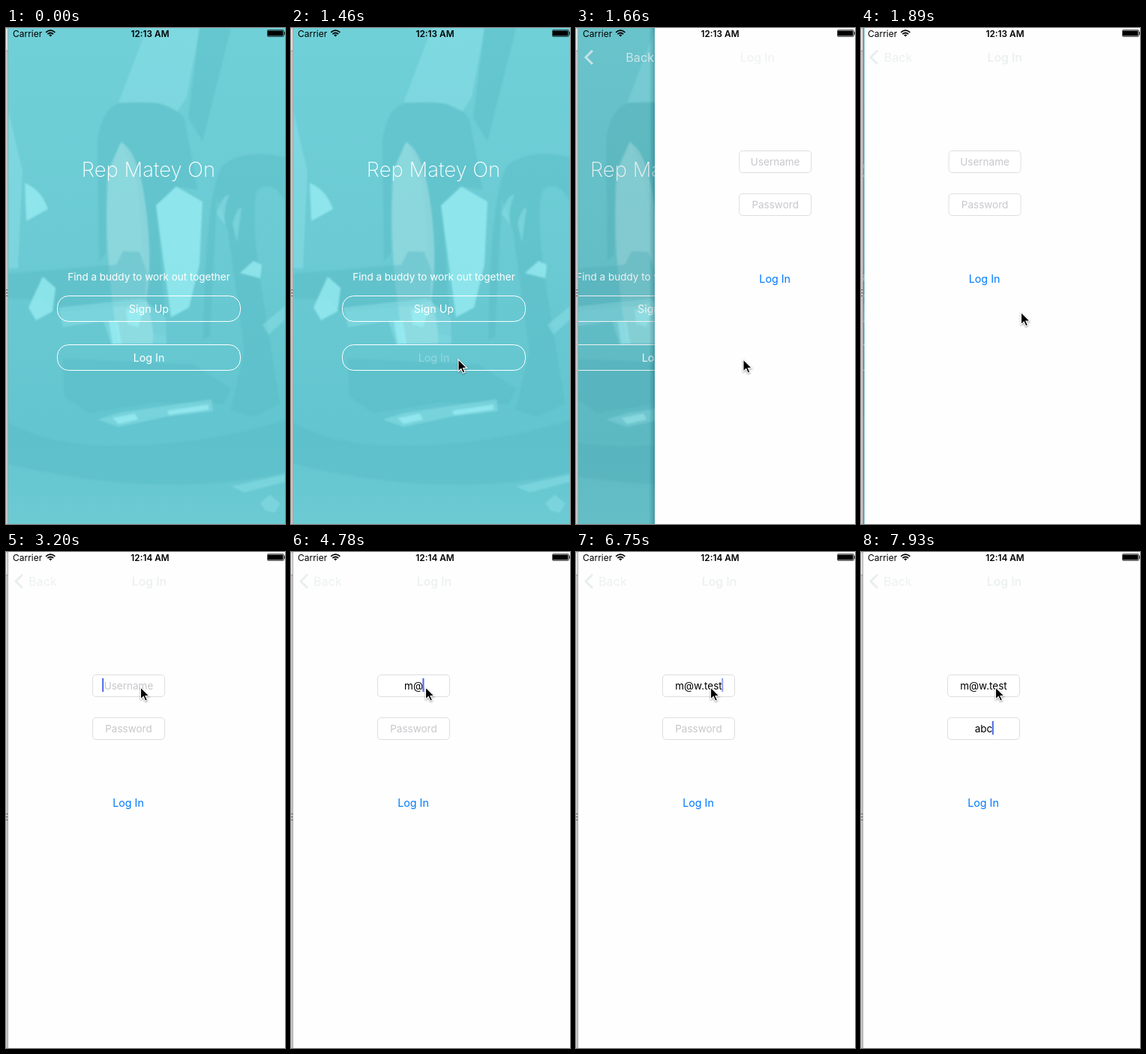
These frames come from a looping animation (372x660 px, 8 s). An HTML page:

```html
<!DOCTYPE html>
<html lang="en">
<head>
<meta charset="utf-8">
<title>Log in walkthrough</title>
<style>
  html, body { margin: 0; width: 372px; height: 660px; overflow: hidden; background: #fff; }
  svg { display: block; font-family: Inter, Roboto, sans-serif; }
  .mid { text-anchor: middle; }
  .outline { fill: none; stroke: #fff; }
  .field { fill: #fff; stroke: #dedede; }
  .input { font-size: 13.5px; }
  .dark { fill: #58b9c4; opacity: .42; }
  .light { fill: #96e7ed; opacity: .4; }
  .bright { fill: #9aeef3; opacity: .75; }
</style>
</head>
<body>
<svg width="372" height="660" viewBox="0 0 372 660">
  <defs>
    <linearGradient id="teal" x2="0" y2="1">
      <stop offset="0" stop-color="#70d0d8"/>
      <stop offset=".45" stop-color="#6bcad3"/>
      <stop offset=".82" stop-color="#62c5cf"/>
      <stop offset="1" stop-color="#6ccad3"/>
    </linearGradient>
    <linearGradient id="edge">
      <stop offset="0" stop-color="#045" stop-opacity="0"/>
      <stop offset="1" stop-color="#045" stop-opacity=".3"/>
    </linearGradient>
    <filter id="soft"><feGaussianBlur stdDeviation="1.3"/></filter>
  </defs>

  <g id="home">
    <rect x="3" width="375" height="660" fill="url(#teal)"/>
    <g filter="url(#soft)">
      <path class="light" d="M188 0H258L241 92 228 112 205 100 150 99Z"/>
      <path class="dark" d="M258 0H300L262 150 243 120Z" opacity=".3"/>
      <path class="dark" d="M122 150Q128 106 152 100Q222 92 238 122L248 175 255 215 228 211 201 236 214 410 190 405 176 210 155 150 134 190 133 300 124 310Z"/>
      <path d="M153 152Q176 162 186 235T187 360Q200 410 195 420L150 420Q128 290 137 190Z" fill="#a0e0e3" opacity=".6"/>
      <path class="bright" d="M200 236 227 211 262 231 258 315 244 372 220 385Z"/>
      <path class="light" d="M3 110 22 190 16 320H3Z"/>
      <path class="bright" d="M25 206Q48 216 56 241L27 257Z" opacity=".6"/>
      <path class="dark" d="M3 327 147 315 156 297 178 298 187 322 186 364 160 370 66 378 50 362 3 360Z"/>
      <path class="bright" d="M30 372 49 331 66 346 62 377 40 389Z" opacity=".6"/>
      <path class="light" d="M70 372 182 360 213 385 214 420 140 421 130 390 76 398Z"/>
      <path class="bright" d="M137 390 149 389 154 420 142 421Z"/>
      <path class="bright" d="M160 374H184L176 398 162 394Z" opacity=".6"/>
      <path class="dark" d="M263 415Q266 210 290 182Q320 160 372 172V230Q355 200 335 215Q326 245 338 330L365 500 330 517 300 508 318 430 296 270 281 225 272 410Z"/>
      <path class="light" d="M281 247Q288 222 298 222Q289 240 292 262ZM302 260Q309 236 314 240L308 285Z"/>
      <path class="bright" d="M312 326 330 310 341 315 339 333Z" opacity=".6"/>
      <path class="light" d="M342 395 372 370V388L350 408Z"/>
      <path class="dark" d="M76 440 250 448 300 480 290 500 200 498 110 512 78 490Z"/>
      <path class="light" d="M122 521 150 512 274 494 276 510 215 517 150 531Z"/>
      <path class="bright" d="M142 519 172 513 176 521 150 527ZM215 509 270 501 270 508 217 515Z" opacity=".5"/>
      <path class="dark" d="M3 525Q60 560 170 556T378 520V590Q210 630 3 580Z" opacity=".3"/>
      <path class="light" d="M339 632 352 621 366 633 358 645 346 642ZM300 610 372 594V604L318 618Z"/>
    </g>
    <g class="mid" fill="#fff">
      <text x="190" y="198" font-size="27.5" font-weight="200">Rep Matey On</text>
      <text x="190.5" y="336" font-size="13.5">Find a buddy to work out together</text>
      <rect class="outline" x="68.5" y="356.5" width="244" height="34" rx="15"/>
      <text x="190.5" y="379" font-size="14.3">Sign Up</text>
      <rect class="outline" x="68.5" y="421.5" width="244" height="34" rx="15"/>
      <text id="press" x="190.5" y="444" font-size="14.3">Log In</text>
    </g>
  </g>
  <rect id="shade" x="3" width="375" height="660"/>

  <g id="login">
    <rect id="shadow" x="-5" width="8" height="660" fill="url(#edge)"/>
    <rect x="3" width="375" height="660" fill="#fefefe"/>
    <rect class="field" x="115.5" y="163.5" width="96" height="29" rx="4.5"/>
    <rect class="field" x="115.5" y="220.5" width="96" height="29" rx="4.5"/>
    <text class="mid input" x="163.5" y="183"></text>
    <text class="mid input" x="163.5" y="240"></text>
    <text class="mid" x="163" y="339" font-size="14.3" fill="#007aff">Log In</text>
    <rect id="caret" width="2" height="18" fill="#4a66e6"/>
  </g>

  <g id="nav" fill="#edf1f1">
    <path d="M22 30 13 39 22 48" fill="none" stroke="#e9eeee" stroke-width="3"/>
    <text id="back" y="45" font-size="16.2">Back</text>
    <text id="heading" class="mid" y="45" font-size="15.8" font-weight="600">Log In</text>
  </g>

  <g id="status">
    <text x="9" y="11.5" font-size="12">Carrier</text>
    <g fill="none" stroke="#000" stroke-width="1.7">
      <path d="M53.2 5.8Q59.3 .6 65.4 5.8M55.4 8.2Q59.3 4.8 63.2 8.2"/>
    </g>
    <path d="M57.2 9.4Q59.3 7.8 61.4 9.4L59.3 11.6Z"/>
    <text id="clock" class="mid" x="192" y="11.5" font-size="11.8" font-weight="600"></text>
    <rect x="348.5" y="2.5" width="22" height="9" rx="1.5" fill="none" stroke="#000" stroke-opacity=".6"/>
    <path d="M349 3.5H369.5V10.5H349ZM371.3 5H372V9H371.3Z"/>
  </g>

  <g id="strip">
    <path d="M0 0H3V660H0Z" fill="#cac7c7"/>
    <path d="M0 1H2V30H0Z" fill="#e4e2e2"/>
    <path d="M2 0H3V660H2Z" fill="#a9a7a7"/>
    <path d="M0 30H3V31H0Z" fill="#999"/>
    <path d="M0 348H2.5V349H0ZM0 352H2.5V353H0ZM0 356H2.5V357H0Z" fill="#666"/>
  </g>

  <path id="mouse" d="M0 0V16L3.8 12.5 6.3 18.2 9 17 6.5 11.5H11.6Z" stroke="#fff" stroke-width="1.1"
    style="filter: drop-shadow(0 1px 1px #0006)"/>
</svg>

<script>
const LOOP = 8000;
const byId = id => document.getElementById(id);
const inputs = document.querySelectorAll(".input");
const placeholders = ["Username", "Password"];
const email = "m@w.test", secret = "abc";

// Each key stroke: time, field, number of typed letters
const keys = [
  [3200, 0, 0], [4430, 0, 1], [4780, 0, 2], [5140, 0, 3], [5380, 0, 4],
  [5680, 0, 5], [5860, 0, 6], [5980, 0, 7], [6150, 0, 8],
  [6810, 1, 0], [7640, 1, 1], [7820, 1, 2], [7930, 1, 3]
];

// Pointer stops: time, x, y
const stops = [
  [480, 362, 483], [770, 232, 451], [1110, 223, 441], [1840, 223, 441],
  [2240, 183, 179], [2360, 179.5, 179], [2540, 179.5, 180]
];

const clamp = v => Math.min(1, Math.max(0, v));
const easeOut = u => 1 - (1 - u) ** 2;
const move = (id, x, y = 0) => byId(id).setAttribute("transform", `translate(${x} ${y})`);
const fade = (id, v) => byId(id).setAttribute("opacity", v);
const setText = (el, s) => { if (el.textContent !== s) el.textContent = s; };

function drawPush(t) {
  const s = Math.max(0, t - 1544) * 0.022;
  const p = t > 2100 ? 1 : 1 - (1 + s) * Math.exp(-s);
  const rest = 1 - p;
  move("home", -112.5 * p);
  move("login", 375 * rest);
  fade("shade", 0.08 * p);
  fade("shadow", p > 0 && p < 1 ? 1 : 0);
  fade("nav", p);
  byId("back").setAttribute("x", 30 + 133 * rest);
  byId("heading").setAttribute("x", 191 + 187 * rest);
  fade("press", t < 1460 ? 1 : 0.3 + 0.7 * clamp((t - 1530) / 50));
}

function drawFields(t) {
  const key = keys.filter(k => k[0] <= t).pop();
  const [since, active, count] = key || [0, 0, 0];
  const typed = active ? [email, secret.slice(0, count)] : [email.slice(0, count), ""];
  inputs.forEach((el, i) => {
    setText(el, typed[i] || placeholders[i]);
    el.setAttribute("fill", typed[i] ? "#000" : "#c7c7cc");
  });

  const half = inputs[active].getComputedTextLength() / 2;
  const age = t - since;
  const blink = age < 1000 ? 1 - clamp((age - 540) / 160) : clamp((age - 1000) / 160);
  move("caret", 163.5 + (typed[active] ? half - 0.5 : -half - 2.5), active ? 225 : 168);
  fade("caret", key ? blink : 0);
}

function drawMouse(t) {
  fade("mouse", t < stops[0][0] ? 0 : 1);
  const next = stops.findIndex(s => s[0] > t);
  const b = stops[next < 0 ? stops.length - 1 : next];
  const a = next > 0 ? stops[next - 1] : b;
  const u = a === b ? 1 : easeOut((t - a[0]) / (b[0] - a[0]));
  move("mouse", a[1] + (b[1] - a[1]) * u, a[2] + (b[2] - a[2]) * u);
}

function draw() {
  const t = performance.now() % LOOP;
  drawPush(t);
  drawFields(t);
  drawMouse(t);
  setText(byId("clock"), t < 2000 ? "12:13 AM" : "12:14 AM");
  requestAnimationFrame(draw);
}
draw();
</script>
</body>
</html>
```
